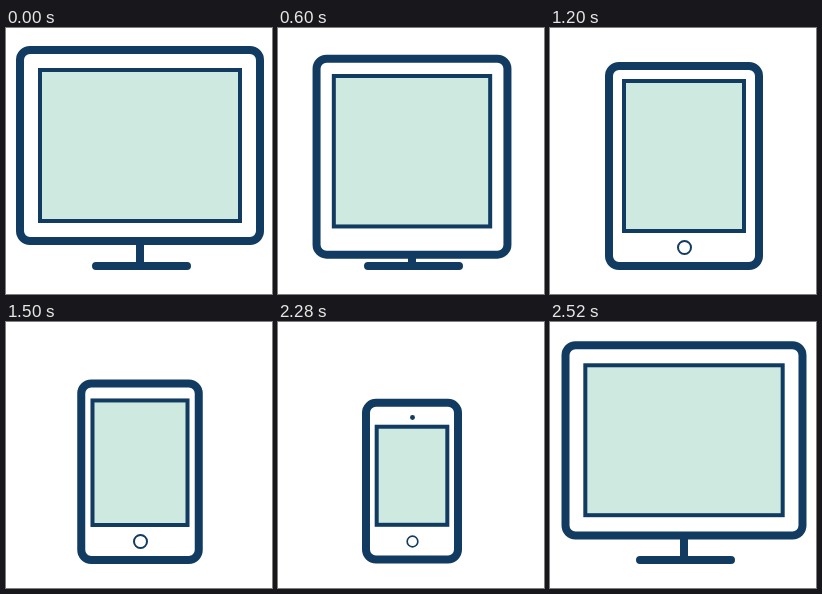
Recreate the animation shown at these times as an HTML page. Size 266x266 px, loop 2.55 s.

```html
<!DOCTYPE html>
<html lang="en">
<head>
<meta charset="utf-8">
<title>Responsive devices</title>
<style>
  html, body { margin: 0; height: 100%; overflow: hidden; background: #fff; }
  svg { display: block; width: 100%; height: 100%; }
  .line { stroke: #113b61; fill: #fff; }
</style>
</head>
<body>
<svg viewBox="0 0 266 266">
  <path id="stand" class="line" d="M134 214V238M90 238H181" stroke-width="8" stroke-linecap="round"/>
  <rect id="body" class="line" rx="10" stroke-width="8"/>
  <rect id="screen" class="line" style="fill:#cee9e0" stroke-width="4"/>
  <circle id="button" class="line" r="6.5" stroke-width="2"/>
  <circle id="speaker" r="3" fill="#113b61"/>
</svg>
<script>
const LOOP = 2550, TICK = 30, CENTER = 134;
const $ = id => document.getElementById(id);

// Outer edges per device: [half width, top, bottom]
const desktop = { body: [124, 18, 217], screen: [102, 40, 195] };
const tablet  = { body: [79, 34, 242],  screen: [62, 51, 205] };
const phone   = { body: [48.5, 78, 242], screen: [36, 104, 205] };

// The screen may set off slightly after the body
const moves = [
  { start: 443,  lag: 0, from: desktop, to: tablet },
  { start: 1345, lag: 8, from: tablet,  to: phone },
  { start: 2250, lag: 0, from: phone,   to: desktop }
];

// Quadratic ease in and out
function ease(t, start, duration) {
  const p = Math.min(1, Math.max(0, (t - start) / duration));
  return p < .5 ? 2 * p * p : 1 - 2 * (1 - p) ** 2;
}

function placeFrame(id, move, progress, stroke) {
  const [half, top, bottom] = move.from[id].map((v, i) => v + (move.to[id][i] - v) * progress);
  const el = $(id);
  el.setAttribute('x', CENTER - half + stroke / 2);
  el.setAttribute('y', top + stroke / 2);
  el.setAttribute('width', 2 * half - stroke);
  el.setAttribute('height', bottom - top - stroke);
}

function placeDot(id, x, y, scale) {
  $(id).setAttribute('transform', `translate(${x} ${y}) scale(${scale})`);
}

function draw(t) {
  const move = moves.findLast(m => t >= m.start) || moves[0];
  placeFrame('body', move, ease(t, move.start, 300), 8);
  placeFrame('screen', move, ease(t, move.start + move.lag, 300), 4);

  const leaving = ease(t, 2250, 100);
  placeDot('button', 134.5, 219.5, ease(t, 635, 100) - leaving);
  placeDot('speaker', 134.5, 95.5, ease(t, 1545, 100) - leaving);
  $('stand').style.display = t < 750 || t > 2330 ? '' : 'none';
}

function loop() {
  const t = performance.now() % LOOP;
  draw(Math.floor(t / TICK) * TICK);
  requestAnimationFrame(loop);
}
loop();
</script>
</body>
</html>
```
